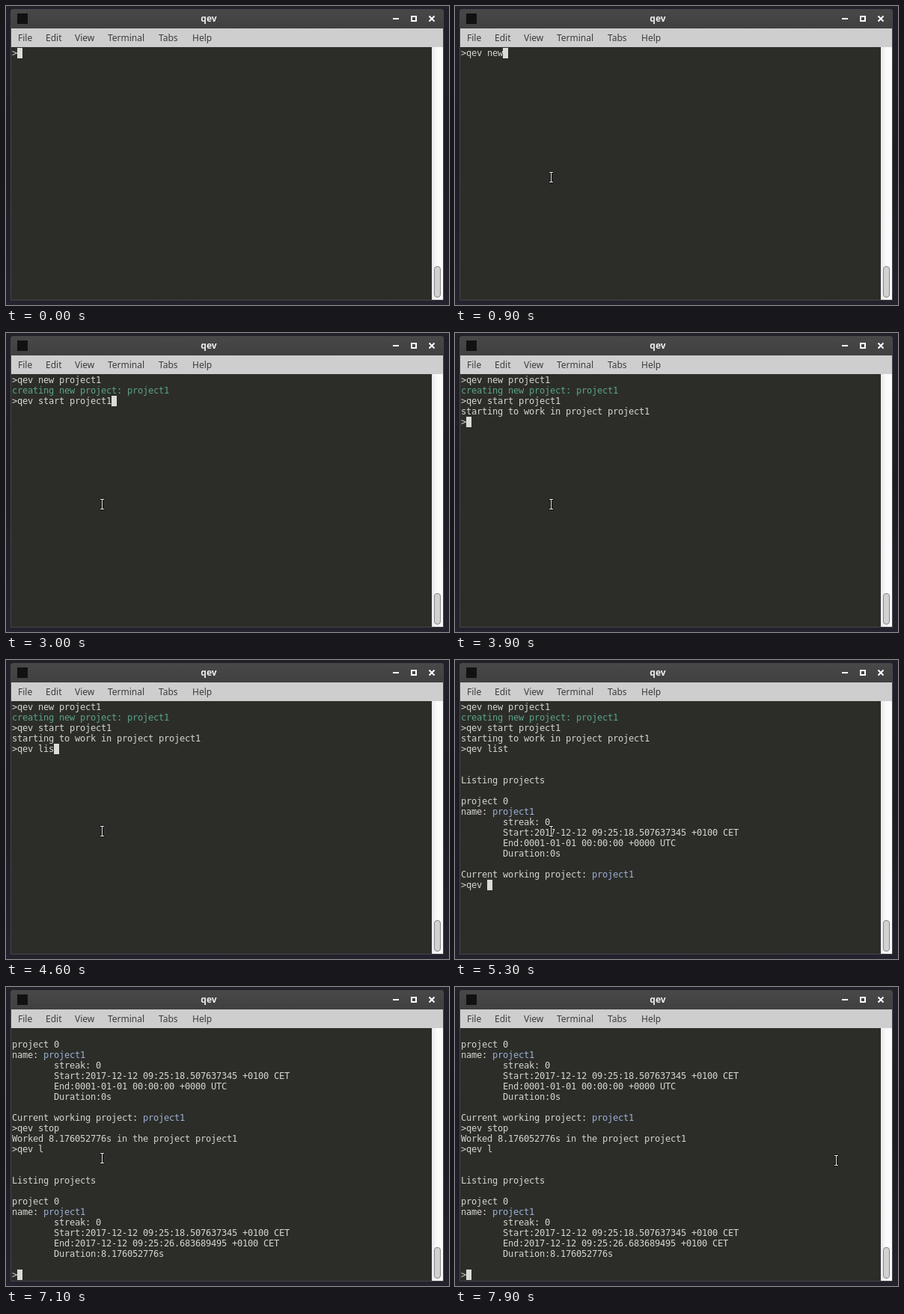
Recreate the animation shown at these times as an HTML page. Size 592x400 px, loop 8000 ms.

```html
<!DOCTYPE html>
<html lang="en">
<head>
<meta charset="utf-8">
<title>Terminal session</title>
<style>
  html, body { margin: 0; width: 100%; height: 100%; overflow: hidden; background: #201f27; }
  #stage { position: relative; width: 592px; height: 400px; overflow: hidden;
    background: linear-gradient(#22212a, #1d1c24 50%, #24222d); font: 12px/25px "Noto Sans", "Open Sans", sans-serif; }
  #stage > * { position: absolute; }
  #frame { left: 6px; top: 4px; width: 577px; height: 388px; border: 1px solid #46464a; border-radius: 3px 3px 0 0; }
  #titlebar { left: 7px; top: 5px; width: 577px; height: 25px; background: linear-gradient(#484848, #404040); }
  #title { left: 171px; top: 4px; width: 200px; text-align: center; font-weight: bold; color: #eee; }
  #icon { left: 15px; top: 10px; width: 14px; height: 14px; background: #111; }
  #menu { left: 7px; top: 30px; width: 577px; height: 25px; background: #cecece; color: #3c3c3c; }
  #menu span { position: absolute; }
  #terminal { left: 7px; top: 55px; width: 562px; height: 338px; background: #2c2d29; }
  #text { margin: 0; left: 8px; top: 56px; color: #d6d6d0; white-space: pre;
    font: 12px/14px "DejaVu Sans Mono", monospace; letter-spacing: calc(7px - 1ch); }
  #text .green { color: #5ca48a; }
  #text .blue { color: #9cb0d4; }
  #caret { width: 7px; height: 14px; background: #dcdcd6; }
  #track { left: 569px; top: 55px; width: 15px; height: 338px; background: linear-gradient(90deg, #e9e9e9, #fbfbfb 50%); }
  #thumb { left: 572px; top: 348px; width: 7px; height: 40px; border: 1px solid #858585; border-radius: 4px; background: #d2d2d2; }
  svg { left: 0; top: 0; }
</style>
</head>
<body>
<div id="stage">
  <div id="frame"></div>
  <div id="titlebar"></div>
  <div id="title">qev</div>
  <div id="icon"></div>
  <div id="menu">
    <span style="left:9px">File</span><span style="left:46px">Edit</span><span style="left:85px">View</span>
    <span style="left:129px">Terminal</span><span style="left:197px">Tabs</span><span style="left:242px">Help</span>
  </div>
  <div id="terminal"></div>
  <div id="track"></div>
  <div id="thumb"></div>
  <div id="caret"></div>
  <pre id="text"></pre>
  <svg width="592" height="400" fill="none">
    <g stroke="#fff" stroke-width="2">
      <path d="M517 17H525M542 14H548V20H542Z"/>
      <path d="M565.5 13.5L572.5 20.5M572.5 13.5L565.5 20.5"/>
    </g>
    <g id="pointer">
      <path d="M-3 -6.5H3M0 -6.5V6.5M-3 6.5H3" stroke="#111" stroke-width="3"/>
      <path d="M-2.5 -6.5H2.5M0 -6.5V6.5M-2.5 6.5H2.5" stroke="#eee"/>
    </g>
  </svg>
</div>
<script>
const LOOP = 8000, STEP = 100, ROWS = 24;
const $ = id => document.getElementById(id);
const clamp = v => Math.max(0, Math.min(1, v));
const colored = (name, s) => `<span class="${name}">${s}</span>`;

const listing = (end, duration) => `

Listing projects

project 0
name: ${colored('blue', 'project1')}
        streak: 0
        Start:2017-12-12 09:25:18.507637345 +0100 CET
        End:${end}
        Duration:${duration}
`;

// Each command: typed pieces [start, end, text], then the time of Enter and its output.
const commands = [
  { typed: [[100, 400, 'qev'], [600, 1500, ' new project1']], enter: 1600,
    output: colored('green', 'creating new project: project1') },
  { typed: [[1800, 2900, 'qev start project1']], enter: 3200,
    output: 'starting to work in project project1' },
  { typed: [[3900, 4700, 'qev list']], enter: 4800,
    output: listing('0001-01-01 00:00:00 +0000 UTC', '0s') +
      '\nCurrent working project: ' + colored('blue', 'project1') },
  { typed: [[4900, 5600, 'qev stop']], enter: 5700,
    output: 'Worked 8.176052776s in the project project1' },
  { typed: [[5900, 6000, 's', 6200], [6200, 6600, 'qev l']], enter: 6800,
    output: listing('2017-12-12 09:25:26.683689495 +0100 CET', '8.176052776s') },
  { typed: [], enter: Infinity }
];

// A piece with a fourth value is erased at that time.
const typedAt = (pieces, t) => pieces.map(([start, end, text, erased = Infinity]) =>
  t >= erased ? '' : text.slice(0, Math.floor(text.length * clamp((t - start) / (end - start)) + 1e-6))
).join('');

function screenAt(t) {
  const lines = [];
  for (const { typed, enter, output } of commands) {
    const input = typedAt(typed, t);
    lines.push('&gt;' + input);
    if (t < enter) return { lines: lines.slice(-ROWS), column: input.length + 1 };
    lines.push(...output.split('\n'));
  }
}

function render(t) {
  const { lines, column } = screenAt(t);
  const html = lines.join('\n');
  if (html !== render.last) $('text').innerHTML = render.last = html;
  $('caret').style.left = 8 + 7 * column + 'px';
  $('caret').style.top = 56 + 14 * (lines.length - 1) + 'px';

  const p = clamp((t - 7500) / 300), eased = p * p * (3 - 2 * p);
  const x = Math.round(128 + 381 * eased) + 0.5, y = Math.round(229 + 3 * eased);
  $('pointer').setAttribute('transform', `translate(${x} ${y})`);
  $('pointer').setAttribute('visibility', t < 100 ? 'hidden' : 'visible');
}

function tick() {
  const t = performance.now() % LOOP;
  render(Math.floor(t / STEP) * STEP);
  requestAnimationFrame(tick);
}
tick();
</script>
</body>
</html>
```
